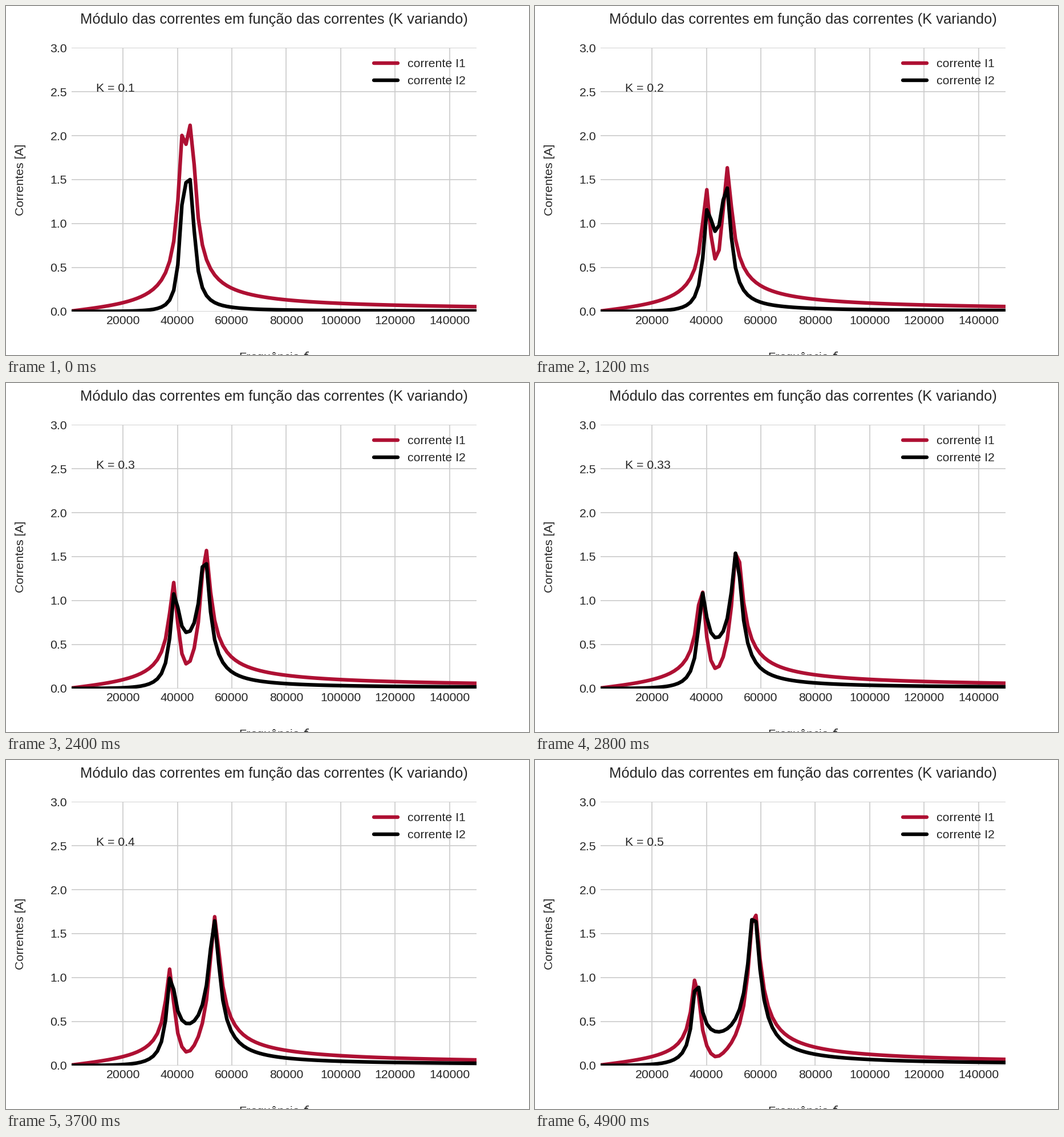
Write a matplotlib script that moves like this. It is 917 px wide and 611 px high and loops after 5000 ms.

```python
import numpy as np
import matplotlib.pyplot as plt
from matplotlib.animation import FuncAnimation

WIDTH, HEIGHT, DPI = 917, 611, 128
FRAMES, INTERVAL = 50, 100
INK, GRID, RED = "0.15", "0.8", "#ae1033"

# Normalised circuit: two equal coils, load in parallel with the second capacitor
RESONANCE = 43310
DRIVE = 0.169
COIL_LOSS = 0.022
LOAD = 0.09
COUPLING = 0.866

freq = np.linspace(1000, 150000, 100)
coeffs = np.linspace(0.1, 0.5, FRAMES)


def pt(points):
    """Scale a size designed for 152.8 dpi to the figure's dpi."""
    return points * 152.8 / DPI


def currents(k):
    x = freq / RESONANCE
    mutual = COUPLING * k * x
    z1 = COIL_LOSS + 1j * (x - 1 / x)
    z2 = COIL_LOSS + 1j * x + 1 / (LOAD + 1j * x)
    i1 = np.abs(DRIVE / (z1 + mutual**2 / z2))
    return i1, i1 * mutual / np.abs(z2)


plt.rcParams.update({
    "font.family": "Liberation Sans",
    "font.size": pt(10),
    "text.color": INK,
    "axes.labelcolor": INK,
    "lines.linewidth": pt(3),
    "lines.solid_capstyle": "round",
})

fig, ax = plt.subplots(figsize=(WIDTH / DPI, HEIGHT / DPI), dpi=DPI, facecolor="white")
fig.subplots_adjust(left=0.125, right=0.9, bottom=0.125, top=0.88)
ax.set(xlim=(1000, 150000), ylim=(0, 3))
ax.set_axisbelow(True)
ax.grid(color=GRID, linewidth=pt(0.8))
ax.spines[:].set_visible(False)
ax.tick_params(length=0, pad=pt(3.5), labelcolor=INK)
ax.set_title("Módulo das correntes em função das correntes (K variando)",
             fontsize=pt(12), pad=pt(20))
ax.set_xlabel("Frequência $f$", labelpad=pt(20))
ax.set_ylabel("Correntes [A]", labelpad=pt(20))

line1, = ax.plot([], [], color=RED, label="corrente I1")
line2, = ax.plot([], [], color="black", label="corrente I2")
label = ax.text(10000, 2.5, "")
ax.legend(loc="upper right", frameon=False)


def update(frame):
    k = coeffs[frame]
    i1, i2 = currents(k)
    line1.set_data(freq, i1)
    line2.set_data(freq, i2)
    label.set_text(f"K = {round(float(k), 2)}")
    return line1, line2, label


anim = FuncAnimation(fig, update, frames=FRAMES, interval=INTERVAL, repeat=True)
plt.show()
```
